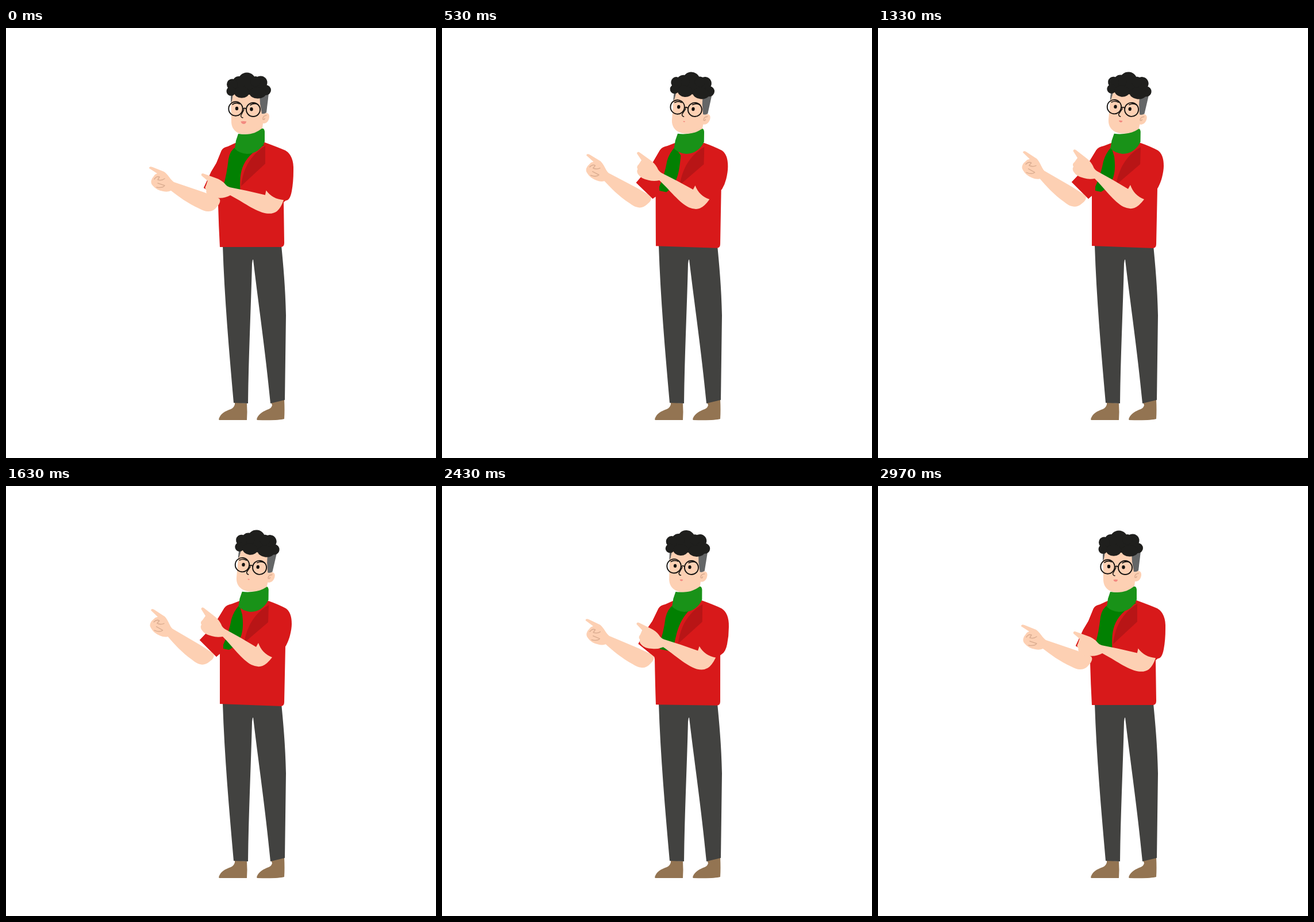
An HTML page with a canvas that plays this animation: 748 by 748 pixels, repeating every 3.03 s.

```html
<!DOCTYPE html>
<html lang="en">
<head>
<meta charset="utf-8">
<title>Pointing man</title>
<style>
  html, body { margin: 0; width: 100%; height: 100%; overflow: hidden; background: #fff; }
  canvas { display: block; width: 748px; height: 748px; }
</style>
</head>
<body>
<canvas id="stage" width="748" height="748"></canvas>
<script>
const ctx = document.getElementById('stage').getContext('2d');
const LOOP = 3030;
const SKIN = '#fdd0b3', RED = '#d8191a', GREEN = '#028002', SCARF = '#199218',
      LAPEL = '#b81516', HAIR = '#1f1f1d', GREY = '#646667', PANTS = '#424240',
      SHOE = '#937452', INK = '#141210', CREASE = '#dcae92', LIPS = '#f38a80';

const clamp = x => Math.max(0, Math.min(1, x));
const ease = (t, from, to) => {
  const u = clamp((t - from) / (to - from));
  return u * u * (3 - 2 * u);
};
const lerp = (a, b, p) => a + (b - a) * p;

// Blend two path strings that share the same commands.
function blend(low, high, p) {
  const nums = high.match(/[\d.]+/g);
  let i = 0;
  return low.replace(/[\d.]+/g, n => lerp(+n, +nums[i++], p).toFixed(2));
}

function fill(color, d) {
  ctx.fillStyle = color;
  ctx.fill(new Path2D(d));
}

function line(color, width, d) {
  ctx.strokeStyle = color;
  ctx.lineWidth = width;
  ctx.lineCap = ctx.lineJoin = 'round';
  ctx.stroke(new Path2D(d));
}

function oval(color, x, y, rx, ry = rx) {
  ctx.fillStyle = color;
  ctx.beginPath();
  ctx.ellipse(x, y, rx, ry, 0, 0, Math.PI * 2);
  ctx.fill();
}

function ring(x, y, r) {
  ctx.strokeStyle = INK;
  ctx.lineWidth = 1.9;
  ctx.beginPath();
  ctx.arc(x, y, r, 0, Math.PI * 2);
  ctx.stroke();
}

// Run draw() rotated about (x, y) and shifted by (dx, dy).
function posed(x, y, degrees, dx, dy, draw) {
  ctx.save();
  ctx.translate(x + dx, y + dy);
  ctx.rotate(degrees * Math.PI / 180);
  ctx.translate(-x, -y);
  draw();
  ctx.restore();
}

function legs() {
  fill(SHOE, 'M398 651 L419 653 Q420 668 419 682 L371 682 Q369 681 372 676 C376 668 386 665 391 663 Q396 661 398 655Z');
  fill(SHOE, 'M461 651 L484 646 Q485 665 484 680 Q474 683 437 682 Q435 681 438 676 C443 668 452 665 457 663 Q462 661 463 656Z');
  fill(PANTS, 'M377 378 L479 378 C482 410 486 450 487 500 L485 647 L460 653 ' +
    'C451 560 439 480 430 403 Q429 401 428 410 C426 490 422 570 421 653 L396 652 C388 560 380 470 377 378Z');
}

function torso(p) {
  fill(RED, blend(
    'M399 200 L386 206 Q377 208 375 213 L366 235 L357 250 L344 278 L371 297 L369 306 Q370 345 372 381 L478 381 Q484 381 484 374 L483 303 L487 300 Q494 300 497 284 Q500 268 500 248 Q501 222 486 213 Q472 207 450 199Z',
    'M406 200 L393 205 Q383 207 380 212 L366 235 L353 251 L337 268 L366 297 L372 292 Q372 340 372 379 L478 383 Q484 383 484 376 L486 279 L487 278 Q492 268 494 260 Q497 248 497 240 Q497 220 487 213 Q474 206 457 200Z', p));
}

function backArm(q) {
  posed(356, 319, 11.5 * q, -14 * q, -8 * q, () => {
    fill(SKIN, 'M249 244 Q249 240 255 242 L275 250 C283 256 286 264 292 268 L345 286 L371 296 ' +
      'Q375 303 367 311 Q360 320 351 319 Q345 319 336 314 C316 305 300 293 287 283 Q281 286 273 284 ' +
      'Q262 282 256 275 Q250 270 254 262 L259 255 L263 253Z');
    line(CREASE, 1.5, 'M258 263 Q262 257 267 259 L264 264 Q271 266 276 262 M262 277 Q272 279 276 274 L264 270');
  });
}

function clothes(p) {
  fill(RED, blend(
    'M375 213 L366 235 L357 250 L344 278 L371 297 L378 285 L392 240Z',
    'M380 212 L366 235 L353 251 L337 268 L366 297 L374 288 L395 240Z', p));
  fill(GREEN, blend(
    'M400 207 Q390 212 387 228 Q384 255 378 275 L380 284 L408 290 C406 255 405 228 450 203Z',
    'M406 207 Q396 218 392 232 Q388 255 378 276 Q378 283 388 285 L412 272 C414 248 411 224 457 204Z', p));
  fill(LAPEL, blend(
    'M451 205 L451 236 L409 275 C412 246 424 222 451 205Z',
    'M457 207 L456 237 L414 273 C419 246 430 223 457 207Z', p));
  posed(425, 200, 0.8 * p, 6.5 * p, 0, () => {
    fill(SCARF, 'M404 184 Q425 187 442 176 Q449 172 450 180 L450 198 C444 211 433 219 419 219 Q406 218 398 210 L400 196Z');
  });
}

function head(p, open, lid) {
  posed(415, 141, 6.2 * p, 11.3 * p, -1.7 * p, () => {
    fill(SKIN, 'M391 112 L392 164 C393 178 403 185 416 185 C429 185 437 181 446 174 L447 166 ' +
      'C454 167 458 160 458 154 C458 147 452 146 446 150 L448 112Z');
    line(CREASE, 1.6, 'M453 152 Q446 153 447 159 Q450 160 450 157');
    fill(GREY, 'M391 115 L395 115 L393 127 L391 130Z');
    fill(GREY, 'M441 114 L457 114 L453 147 Q449 150 445 149 L442 132Z');

    oval(HAIR, 422, 102, 32, 14);
    for (const [x, y, r] of [
      [419, 93, 15.5], [405, 95, 11], [443, 95, 11.5], [393.5, 98, 9.5], [391.5, 110, 8],
      [452, 108, 9], [434, 93, 9]
    ]) oval(HAIR, x, y, r);
    oval(HAIR, 410, 112, 13, 9.8);
    oval(HAIR, 438, 113, 14.5, 9.8);

    line(INK, 1.7, 'M394 133 Q400 129 406 132 M425 134 Q432 130 438 133');
    oval(INK, 401.5, 140, 2.7, lerp(3.2, 0.8, lid));
    oval(INK, 427, 141.3, 2.7, lerp(3.2, 0.8, lid));
    ring(399.5, 140.5, 12.2);
    ring(430, 142, 12);
    line(INK, 1.7, 'M412 141 Q415 138 418 141');
    line(INK, 1.5, 'M414 142 L408.5 152.5 Q409 156 412 156');

    const w = lerp(1.8, 5, open), h = lerp(1.4, 4.6, open);
    const x = 413.3, y = 164.8 - h / 2;
    fill(LIPS, `M${x - w} ${y} Q${x} ${y - 1.2} ${x + w} ${y} Q${x + w * 0.7} ${y + h} ${x + w * 0.1} ${y + h} Q${x - w * 0.7} ${y + h} ${x - w} ${y}Z`);
  });
}

function frontArm(p) {
  const down = 1 - p;
  posed(438, 314, -17.6 * down, 26 * down, 8 * down, () => {
    fill(SKIN, 'M339.5 214 Q340 210 344 212 L362 226 Q370 232 374 240 Q376 246 381 249 Q409 264 435 280 L439 273 ' +
      'Q445 291 463 298 Q454 310 446 313 Q438 316 427 311 C410 302 394 279 377 262 Q367 264 358 261 ' +
      'Q345 258 341 251 Q337 246 340 241 Q337 237 342 233 L347 226Z');
  });
}

function draw(t) {
  const fall = ease(t, 1630, 2970);
  const rise = ease(t, 0, 670);
  const p = rise * (1 - fall);
  const q = (0.85 * rise + 0.15 * ease(t, 0, 1600)) * (1 - fall);
  const open = 0.5 + 0.5 * Math.cos(t / 1060 * Math.PI * 2);
  const lid = clamp(1.6 - Math.abs(t - 2030) / 70);

  ctx.fillStyle = '#fff';
  ctx.fillRect(0, 0, 748, 748);
  legs();
  torso(p);
  backArm(q);
  clothes(p);
  head(p, open, lid);
  frontArm(p);
}

function tick() {
  draw(performance.now() % LOOP);
  requestAnimationFrame(tick);
}
tick();
</script>
</body>
</html>
```
